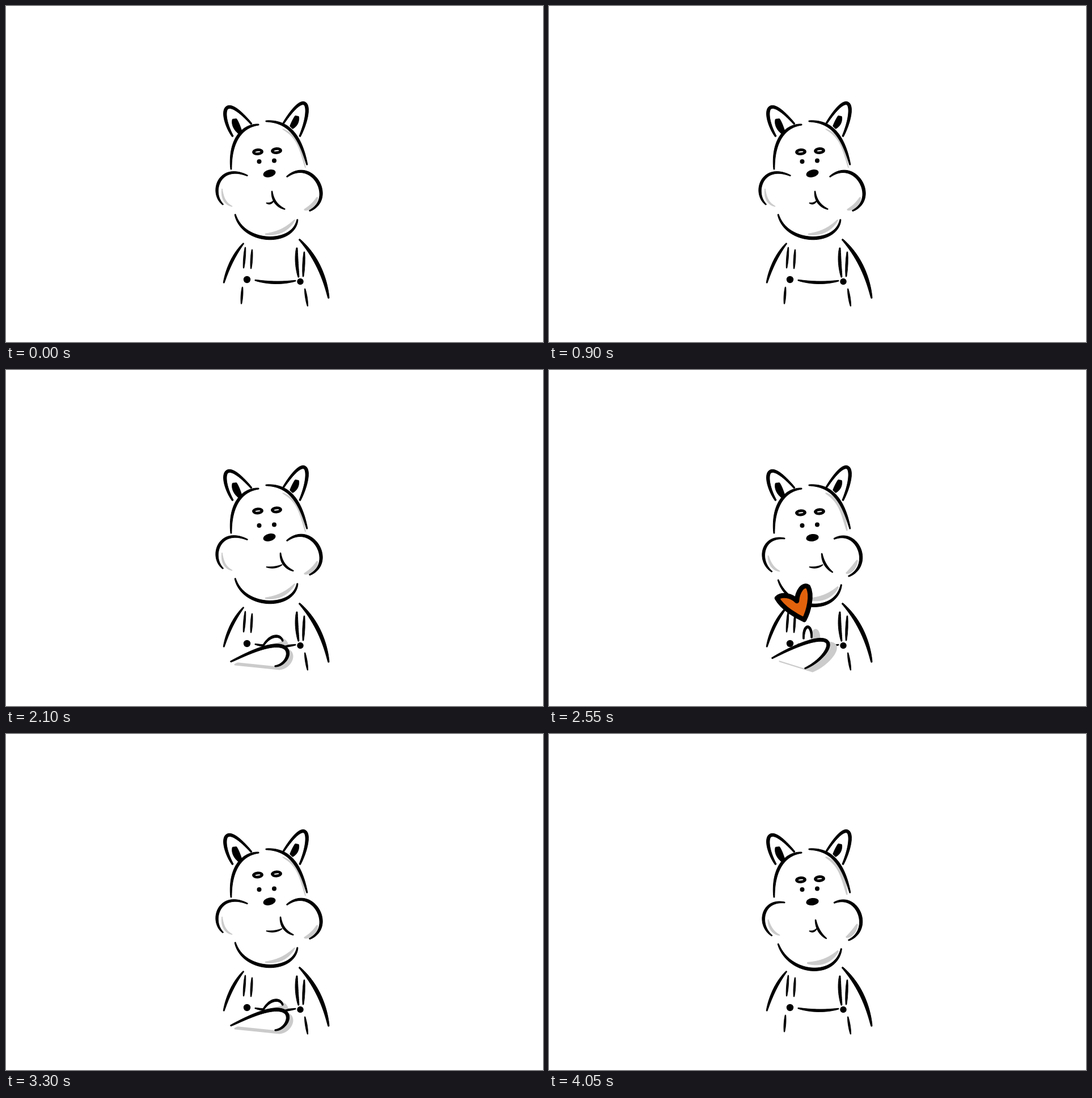
These frames come from a looping animation (947 px wide and 592 px high, 4200 ms). An HTML page with a canvas:

```html
<!DOCTYPE html>
<html>
<head>
<meta charset="utf-8">
<style>
  html, body { margin: 0; width: 100%; height: 100%; overflow: hidden; background: #fff; }
  canvas { display: block; }
</style>
</head>
<body>
<canvas id="stage" width="947" height="592"></canvas>
<script>
const ctx = document.getElementById('stage').getContext('2d');
const STEP = 150, STEPS = 28, GRAY = '#cbcbcb';

const lerp = (a, b, t) => a + (b - a) * t;
const lerpPoint = (a, b, t) => [lerp(a[0], b[0], t), lerp(a[1], b[1], t)];
const parse = text => text.split(' ').map(pair => pair.split(',').map(Number));

// Control points, part of the way from one shape to another
function morph(from, to, t) {
  const target = parse(to);
  return parse(from).map((p, i) => lerpPoint(p, target[i], t));
}

const shift = (points, dx, dy) => points.map(([x, y]) => [x + dx, y + dy]);

// Bezier curve of any degree
function bezier(points, t) {
  if (points.length === 1) return points[0];
  return bezier(points.slice(1).map((p, i) => lerpPoint(points[i], p, t)), t);
}

function sample(shape) {
  const points = typeof shape === 'string' ? parse(shape) : shape;
  return Array.from({ length: 41 }, (_, i) => bezier(points, i / 40));
}

function fillShape(points, color) {
  ctx.beginPath();
  points.forEach(([x, y]) => ctx.lineTo(x, y));
  ctx.closePath();
  ctx.fillStyle = color;
  ctx.fill();
}

// Brush stroke: full width in the middle, tapering to a fraction of it at the ends
function ink(shape, width, tip = .45, color = '#000') {
  const pts = sample(shape), last = pts.length - 1, left = [], right = [];
  pts.forEach(([x, y], i) => {
    const a = pts[Math.max(i - 1, 0)], b = pts[Math.min(i + 1, last)];
    const angle = Math.atan2(b[1] - a[1], b[0] - a[0]);
    const half = (width * lerp(tip, 1, Math.sin(Math.PI * i / last) ** .7) - 1) / 2;
    const nx = -Math.sin(angle) * half, ny = Math.cos(angle) * half;
    left.push([x + nx, y + ny]);
    right.unshift([x - nx, y - ny]);
  });
  fillShape(left.concat(right), color);
  ctx.strokeStyle = color;
  ctx.lineWidth = 1;
  ctx.lineJoin = 'round';
  ctx.stroke();
}

const shade = (shape, width) => ink(shape, width, .3, GRAY);

function oval(x, y, rx, ry = rx, turn = 0, color = '#000') {
  ctx.beginPath();
  ctx.ellipse(x, y, rx, ry, turn, 0, 7);
  ctx.fillStyle = color;
  ctx.fill();
}

function drawBody(handOut) {
  ink('419,418 395,446 384,488', 6);
  ink('517,411 558,452 569,515', 7.5, .4);
  ink('422,425 419,462', 4.5);
  ink('434,429 432,463', 4.5);
  ink('513,426 511,450 516,478', 6);
  ink('526,433 524,477', 5);
  oval(425, 482, 6.2);
  oval(519, 485.5, 5.7);
  ink('439,483 475,491 511,484', 5.5);
  if (!handOut) ink('417,495 415,525', 4.5);
  ink('527,498 532,529', 4.5);
}

// squeeze runs from 0, full cheeks, to 1, sucked in
function drawHead(squeeze, happy) {
  const pose = (full, thin) => morph(full, thin, squeeze);

  ink('400,230 378,195 378,145 433,208', 6.5, .55);
  ink('489,207 532,140 542,178 518,230', 6.5, .55);
  ink('403,199 404,210 413,223', 13, .6);
  ink('513,194 511,206 503,214', 12, .6);

  shade(pose('488,217 515,230 520,250 528,285', '488,217 513,230 517,250 523,281'), lerp(5, 9, squeeze));
  ink('397,288 394,235 418,210 446,209', 6);
  ink('458,203 502,202 520,235 531,280', 6);

  const lift = happy ? 8.5 - 6 * squeeze : 0;
  for (const [x, y] of [[444, 257], [477, 255]]) {
    oval(x, y - lift, 10, 6, -.06);
    oval(x, y - lift, 4.5, 1, -.12, '#fff');
  }
  oval(446.5, 274, 4);
  oval(473, 272.5, 4);
  oval(464.5, 295 + squeeze, 11.2, 6.5, .25 * (squeeze - 1));

  shade(pose('381,322 381,347 399,353', '392,332 399,352 415,356'), lerp(4.5, 6, squeeze));
  shade(pose('526,359 543,355 549,337', '522,357 530,352 538,333'), 8);
  ink(pose('426,299 375,276 359,330 383,350', '406,295 374,305 376,345 404,361'), 5.8);
  ink(pose('495,301 540,265 582,340 535,361', '510,294 549,290 561,350 521,366'), 6.5);

  const smirk = happy ? 15 - 8 * squeeze : 0;
  ink(shift(pose('469,326 470,350 492,358', '471,328 475,348 487,363'), smirk, happy ? -4 : 0), 5);
  ink([[459, 347], [467 + smirk / 2, 350], [472 + smirk, 343]], 3.8);

  shade(pose('457,402 490,402 509,377', '454,405 490,412 511,387'), lerp(7, 11, squeeze));
  ink(pose('404,367 418,421 508,422 514,376', '404,372 428,430 505,440 517,380'), 6.3);
}

function drawHand(raise) {
  const hand = morph('396,514 440,493 520,450 508,520 474,522', '393,508 440,482 530,440 500,505 451,526', raise);
  const thumb = morph('453,487 465,465 485,465 488,478', '449,474 448,446 464,446 463,472', raise);
  const reach = lerp(8, 14, raise);
  for (const part of [thumb, hand]) {
    const shadow = sample(shift(part, reach, 5));
    fillShape(shadow, GRAY);
    ctx.strokeStyle = GRAY;
    ctx.lineWidth = 3;
    ctx.stroke();
  }
  fillShape(sample(thumb), '#fff');
  fillShape(sample(hand), '#fff');
  ink(thumb, 5.5, .6);
  ink(hand, 6.8);
}

function drawHeart(scale) {
  const heart = new Path2D('M450 440C437 434 412 420 402 402C410 394 428 397 437 407C438 390 448 376 457 382C465 397 458 425 450 440Z');
  ctx.save();
  ctx.translate(450, 440);
  ctx.scale(scale, scale);
  ctx.translate(-450, -440);
  ctx.fillStyle = '#e2620c';
  ctx.strokeStyle = '#000';
  ctx.lineWidth = 8.5;
  ctx.lineJoin = 'round';
  ctx.fill(heart);
  ctx.stroke(heart);
  ctx.restore();
}

function draw(now) {
  const step = Math.floor(now / STEP) % STEPS;
  const away = Math.abs(step - 18); // steps from the middle of the heart scene
  const handOut = away <= 4;
  const raise = Math.min(1, (4 - away) / 2);
  // every second chew stays at full cheeks
  const squeeze = step % 8 === 6 ? 0 : (1 - Math.cos(step * Math.PI / 2)) / 2;

  ctx.fillStyle = '#fff';
  ctx.fillRect(0, 0, 947, 592);
  drawBody(handOut);
  drawHead(squeeze, handOut);
  if (handOut) drawHand(raise);
  if (raise === 1) drawHeart(Math.min(1, (step - 15) / 2));
  requestAnimationFrame(draw);
}
requestAnimationFrame(draw);
</script>
</body>
</html>
```
